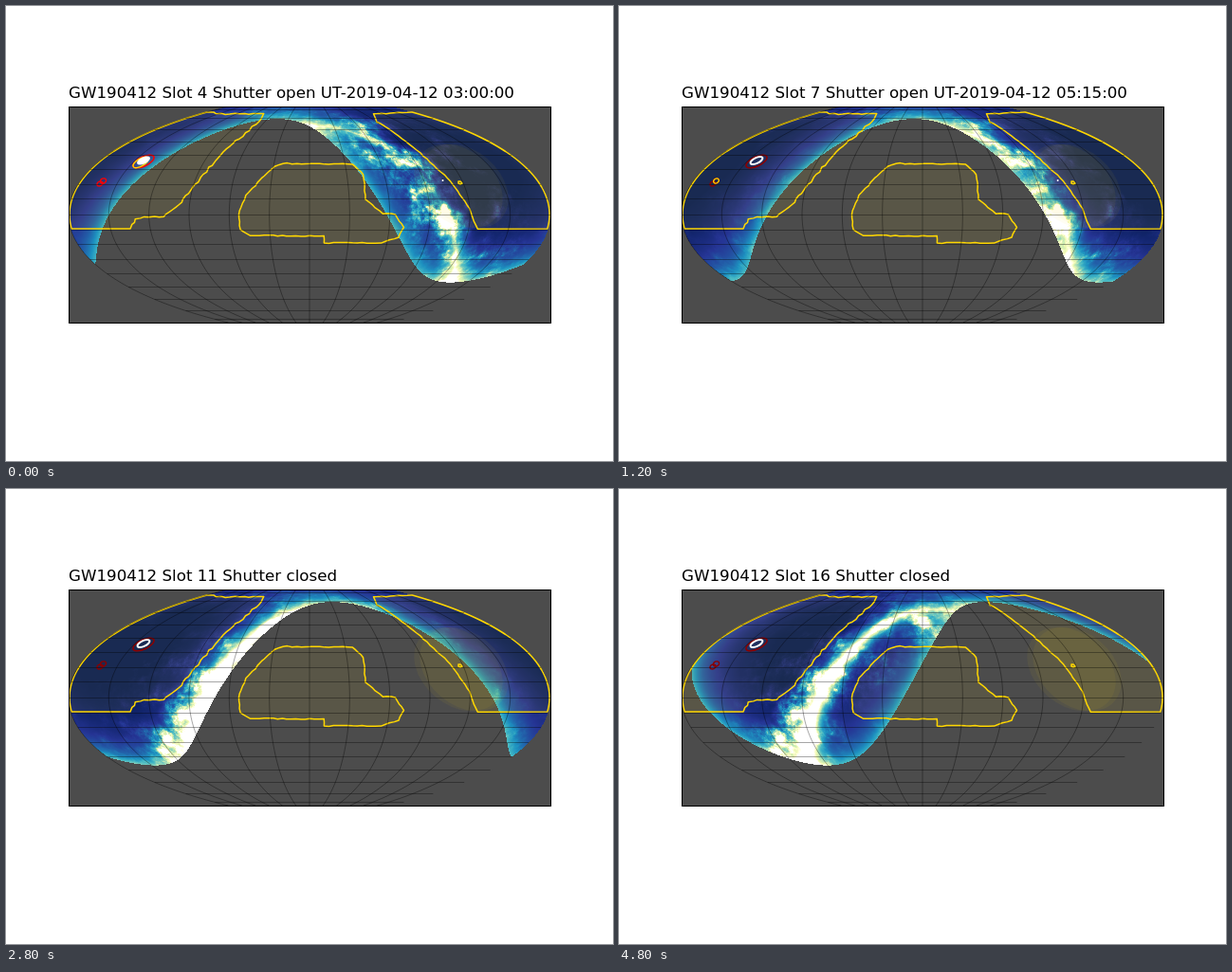
Write an HTML page with a canvas that moves like this. It is 640 px wide and 480 px high and loops after 5200 ms.

```html
<!DOCTYPE html>
<html lang="en">
<head>
<meta charset="utf-8">
<title>Sky visibility by slot</title>
<style>
  html, body { margin: 0; width: 100%; height: 100%; overflow: hidden; background: #fff; }
  #stage { position: relative; width: 640px; height: 480px; }
  canvas { position: absolute; left: 0; top: 0; }
  #title { position: absolute; left: 66px; top: 81px; font: 16.7px/20px "DejaVu Sans", sans-serif; color: #000; white-space: pre; }
</style>
</head>
<body>
<div id="stage">
  <canvas id="sky" width="640" height="480"></canvas>
  <div id="title"></div>
</div>
<script>
const ctx = document.getElementById('sky').getContext('2d');
const title = document.getElementById('title');
const { PI, sin, cos, asin, atan2, sqrt, abs, exp, floor, ceil, hypot, min, max } = Math;
const RAD = PI / 180;
const BOX = { x: 66, y: 106, w: 508, h: 228 };
const CX = 320, CY = 220, HALF_W = 254, HALF_H = 114.2;
const STEP = 400, COUNT = 13;
const OPEN_TIMES = ['03:00:00', '03:44:00', '04:30:00', '05:15:00'];
const GRAY = [76, 76, 76];
const STOPS = ['081d58', '253494', '225ea8', '1d91c0', '41b6c4', '7fcdbb', 'c7e9b4', 'edf8b1', 'ffffd9']
  .map(h => [0, 2, 4].map(i => parseInt(h.slice(i, i + 2), 16)));

// McBryde-Thomas flat-polar quartic projection
const K = 1 + Math.SQRT1_2;
function rowAt(y) {
  const s = max(-1, min(1, (CY - y) / HALF_H)) * Math.SQRT1_2;
  const theta = 2 * asin(s);
  return {
    sinDec: max(-1, min(1, (s + sin(theta)) / K)),
    halfWidth: HALF_W * (1 + 2 * cos(theta) / cos(theta / 2)) / 3
  };
}
function parallelY(deg) {
  let theta = deg * RAD;
  for (let i = 0; i < 12; i++)
    theta -= (sin(theta / 2) + sin(theta) - K * sin(deg * RAD)) / (cos(theta / 2) / 2 + cos(theta));
  return CY - HALF_H * sin(theta / 2) / Math.SQRT1_2;
}

function hash(x, y, z) {
  const v = sin(x * 127.1 + y * 311.7 + z * 74.7) * 43758.5453;
  return v - floor(v);
}
const mix = (a, b, t) => a + (b - a) * t;
const ease = t => t * t * (3 - 2 * t);
function noise(x, y, z) {
  const i = floor(x), j = floor(y), k = floor(z);
  const u = ease(x - i), v = ease(y - j), w = ease(z - k);
  const line = (b, c) => mix(hash(i, b, c), hash(i + 1, b, c), u);
  const face = c => mix(line(j, c), line(j + 1, c), v);
  return mix(face(k), face(k + 1), w);
}
function clouds(x, y, z) {
  let sum = 0, weight = 0.42;
  for (let f = 5; f < 120; f *= 2.1, weight *= 0.62) sum += weight * noise(x * f + 9, y * f + 5, z * f + 2);
  return sum;
}

// Galactic dust at one place on the sky: a thin bright plane plus clumpy clouds
const POLE_RA = 192.86 * RAD, POLE_DEC = 27.13 * RAD;
function dust(ra, sd, cd) {
  const d = ra - POLE_RA;
  const b = asin(sd * sin(POLE_DEC) + cd * cos(POLE_DEC) * cos(d)) / RAD;
  const l = 122.93 * RAD - atan2(cd * sin(d), sd * cos(POLE_DEC) - cd * sin(POLE_DEC) * cos(d));
  const clump = exp(8 * (clouds(cd * cos(ra), cd * sin(ra), sd) - 0.5));
  const bump = (at, width) => exp(-(((b - at) / width) ** 2));
  const plane = (1.55 + 1.4 * cos(l)) * exp(-abs(b) / 4.4) * (0.6 + 0.4 * clump);
  const outer = 0.32 * max(0, -cos(l)) * bump(-7, 16);
  const inner = 0.28 * max(0, cos(l)) ** 6 * bump(13, 8);
  return plane + clump * (outer + inner + 0.03 * bump(0, 45));
}

const pixels = [];
for (let j = 0; j < BOX.h; j++) {
  const { sinDec, halfWidth } = rowAt(BOX.y + j + 0.5);
  const cosDec = sqrt(1 - sinDec * sinDec);
  for (let i = 0; i < BOX.w; i++) {
    const ra = (BOX.x + i + 0.5 - CX) / halfWidth * PI;
    pixels.push(abs(ra) > PI ? null : { ra, sinDec, cosDec, dust: dust(ra, sinDec, cosDec) });
  }
}

function shade(v) {
  if (v >= 1) return [255, 255, mix(217, 255, min(1, (v - 1) * 8))];
  const p = max(0, v) * 8, i = floor(p);
  return STOPS[i].map((c, k) => mix(c, STOPS[i + 1][k], p - i));
}

const image = ctx.createImageData(BOX.w, BOX.h);
const LAT = 31.96 * RAD, MIN_HEIGHT = 0.2;
function drawSky(n) {
  const zenith = (134 + 11.28 * n) * RAD;
  pixels.forEach((p, i) => {
    let color = GRAY;
    if (p) {
      const height = p.sinDec * sin(LAT) + p.cosDec * cos(LAT) * cos(p.ra - zenith);
      if (height > MIN_HEIGHT) color = shade(p.dust + 0.125 * (1 / height - 1) - 0.02);
    }
    image.data.set([...color, 255], i * 4);
  });
  ctx.putImageData(image, BOX.x, BOX.y);
}

function meridian(path, deg, top = BOX.y, bottom = BOX.y + BOX.h) {
  const step = top < bottom ? 1 : -1;
  for (let y = top; (bottom - y) * step >= 0; y += step)
    path.lineTo(CX + rowAt(y).halfWidth * deg / 180, y);
}
const grid = new Path2D();
for (let deg = -180; deg < 180; deg += 30) {
  const line = new Path2D();
  meridian(line, deg);
  grid.addPath(line);
}
for (let deg = -80; deg <= 80; deg += 10) {
  const y = floor(parallelY(deg)) + 0.5, w = rowAt(y).halfWidth;
  grid.moveTo(CX - w, y);
  grid.lineTo(CX + w, y);
}

// Footprint outlines: a few corners joined by slightly ragged lines
function ragged(path, corners, size) {
  const wobble = (x, y, seed) => (hash(floor(x), floor(y), seed) - 0.5) * size;
  corners.forEach(([x, y], i) => {
    if (!i) return path.lineTo(x, y);
    const [px, py] = corners[i - 1], parts = ceil(hypot(x - px, y - py) / 5);
    for (let k = 1; k <= parts; k++) {
      const qx = mix(px, x, k / parts), qy = mix(py, y, k / parts);
      path.lineTo(qx + wobble(qx, qy, 1), qy + wobble(qx, qy, 2));
    }
  });
  path.closePath();
  return path;
}
function rimRegion(deg, size, corners) {
  const path = new Path2D();
  meridian(path, deg, 235, 112);
  return ragged(path, corners, size);
}
const regions = [
  rimRegion(-179.3, 2, [[219, 112], [222, 114], [271, 113.5], [270, 119], [253, 134], [229, 154], [205, 181],
    [190, 201], [176, 216], [166, 222], [137, 224], [132, 235]]),
  rimRegion(179.3, 1.2, [[427, 112], [387, 114], [391, 122], [414, 137], [440, 158], [469, 185], [489, 214], [497, 235]]),
  ragged(new Path2D(), [[284, 169], [292, 166], [365, 167], [377, 178], [379, 204], [397, 219], [411, 220],
    [419, 233], [414, 244], [395, 250], [335, 250], [335, 243], [257, 242], [247, 236], [245, 220], [253, 200], [269, 182], [284, 169]], 1.2),
  new Path2D('M477 185h2l2 2-2 1-2-1z')
];

function ellipse(x, y, rx, ry, deg = 0) {
  ctx.beginPath();
  ctx.ellipse(x, y, rx, ry, deg * RAD, 0, 2 * PI);
}
function disc(color, ...shape) {
  ellipse(...shape);
  ctx.fillStyle = color;
  ctx.fill();
}
function ring(color, width, ...shape) {
  ellipse(...shape);
  ctx.strokeStyle = color;
  ctx.lineWidth = width;
  ctx.stroke();
}

function drawFootprint() {
  ctx.fillStyle = 'rgba(255,215,0,.07)';
  regions.forEach(r => ctx.fill(r));
  for (const x of [483, 477]) disc('rgba(255,215,0,.05)', x, 190, 52, 38, 40);
  ctx.strokeStyle = 'gold';
  ctx.lineWidth = 1.5;
  ctx.lineJoin = 'round';
  regions.forEach(r => ctx.stroke(r));
}

function drawTargets(n) {
  const red = n < 3 ? '#f00' : '#8b0000';
  ring(red, 1.5, 145, 164, 12, 5, -25);
  ring(red, 1.4, 99, 187.5, 3.2, 2.3, -25);
  ring(red, 1.4, 102.5, 184.5, 3.2, 2.5, -25);
  if (n < 3) ring('gold', 1.4, 142, 165, 9, 4, -30);
  if (n === 3) ring('gold', 1.4, 102.5, 184.5, 3, 2.3, -30);
  if (n === 0) disc('#fff', 145, 163, 7.5, 3.6, -25);
  else ring('#fff', 2, 145, 163, 7, 2.8, -25);
  if (n < 5) disc('#fff', 460.5 + n * 0.7, 184, 1, 1);
}

function draw(n) {
  drawSky(n);
  ctx.save();
  ctx.beginPath();
  ctx.rect(BOX.x, BOX.y, BOX.w, BOX.h);
  ctx.clip();
  drawFootprint();
  drawTargets(n);
  ctx.strokeStyle = 'rgba(0,0,0,.5)';
  ctx.lineWidth = 0.7;
  ctx.stroke(grid);
  ctx.restore();
  ctx.strokeStyle = '#000';
  ctx.lineWidth = 1;
  ctx.strokeRect(BOX.x + 0.5, BOX.y + 0.5, BOX.w, BOX.h);
  const state = OPEN_TIMES[n] ? 'open UT-2019-04-12 ' + OPEN_TIMES[n] : 'closed';
  title.textContent = `GW190412 Slot ${n + 4} Shutter ${state}`;
}

let shown = 0;
draw(0);
const start = performance.now();
function tick() {
  const n = floor((performance.now() - start) / STEP) % COUNT;
  if (n !== shown) draw(shown = n);
  requestAnimationFrame(tick);
}
requestAnimationFrame(tick);
</script>
</body>
</html>
```
